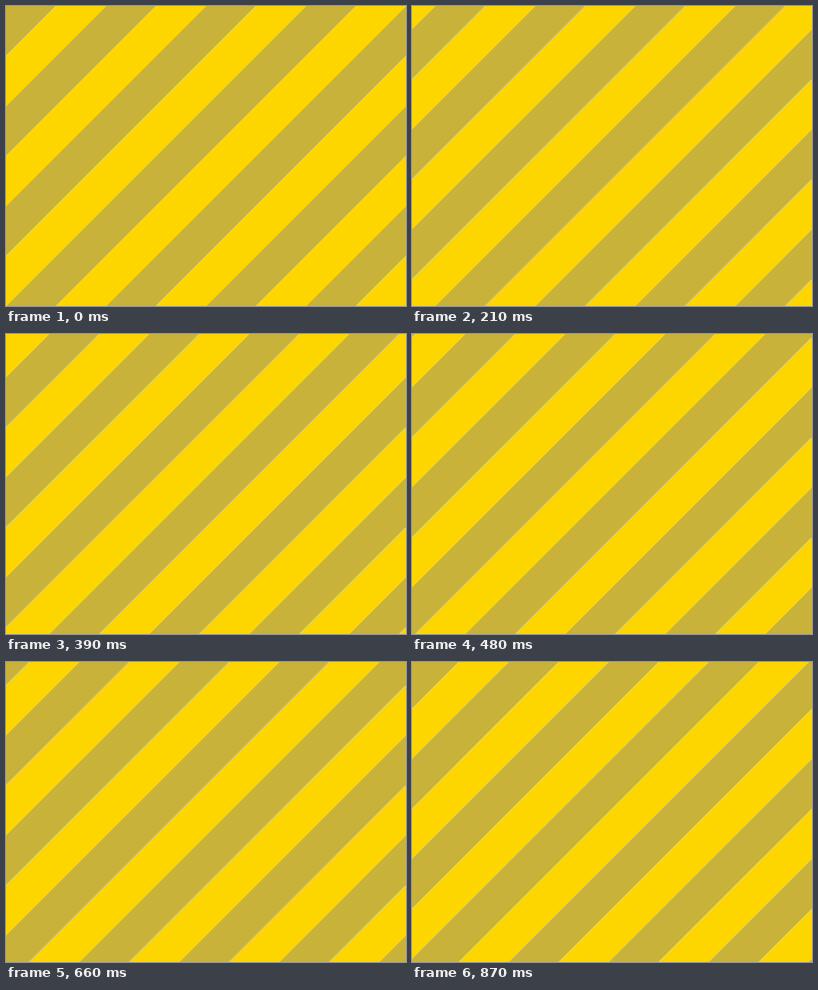
These frames come from a looping animation (400x300 px, 900 ms). An HTML page with a canvas:

```html
<!DOCTYPE html>
<html lang="en">
<head>
<meta charset="utf-8">
<title>Sliding stripes</title>
<style>
  html, body { margin: 0; width: 100%; height: 100%; overflow: hidden; }
  canvas { display: block; }
</style>
</head>
<body>
<canvas id="stage" width="400" height="300"></canvas>
<script>
  const W = 400, H = 300;
  const LOOP = 900, STEP = 30;
  const PERIOD = 100, BAND = PERIOD / 2;
  const KHAKI = '#c8b23a', YELLOW = '#fdd600';
  const ctx = document.getElementById('stage').getContext('2d');

  // Band between the diagonals x + y = start and x + y = start + BAND
  function drawBand(start, color) {
    ctx.fillStyle = color;
    ctx.beginPath();
    ctx.moveTo(start, 0);
    ctx.lineTo(start + BAND, 0);
    ctx.lineTo(start + BAND - H, H);
    ctx.lineTo(start - H, H);
    ctx.fill();
  }

  function draw(time) {
    const tick = Math.floor((time % LOOP) / STEP + 1e-6);
    const shift = PERIOD * tick * STEP / LOOP;
    // Light backdrop shows softly through the antialiased seams
    ctx.fillStyle = '#fff';
    ctx.fillRect(0, 0, W, H);
    for (let x = shift - PERIOD; x < W + H; x += PERIOD) {
      drawBand(x, KHAKI);
      drawBand(x + BAND, YELLOW);
    }
  }

  let origin = null;
  function frame(now) {
    if (origin === null) origin = now;
    draw(Math.max(0, now - origin));
    requestAnimationFrame(frame);
  }

  draw(0);
  requestAnimationFrame(frame);
</script>
</body>
</html>
```
